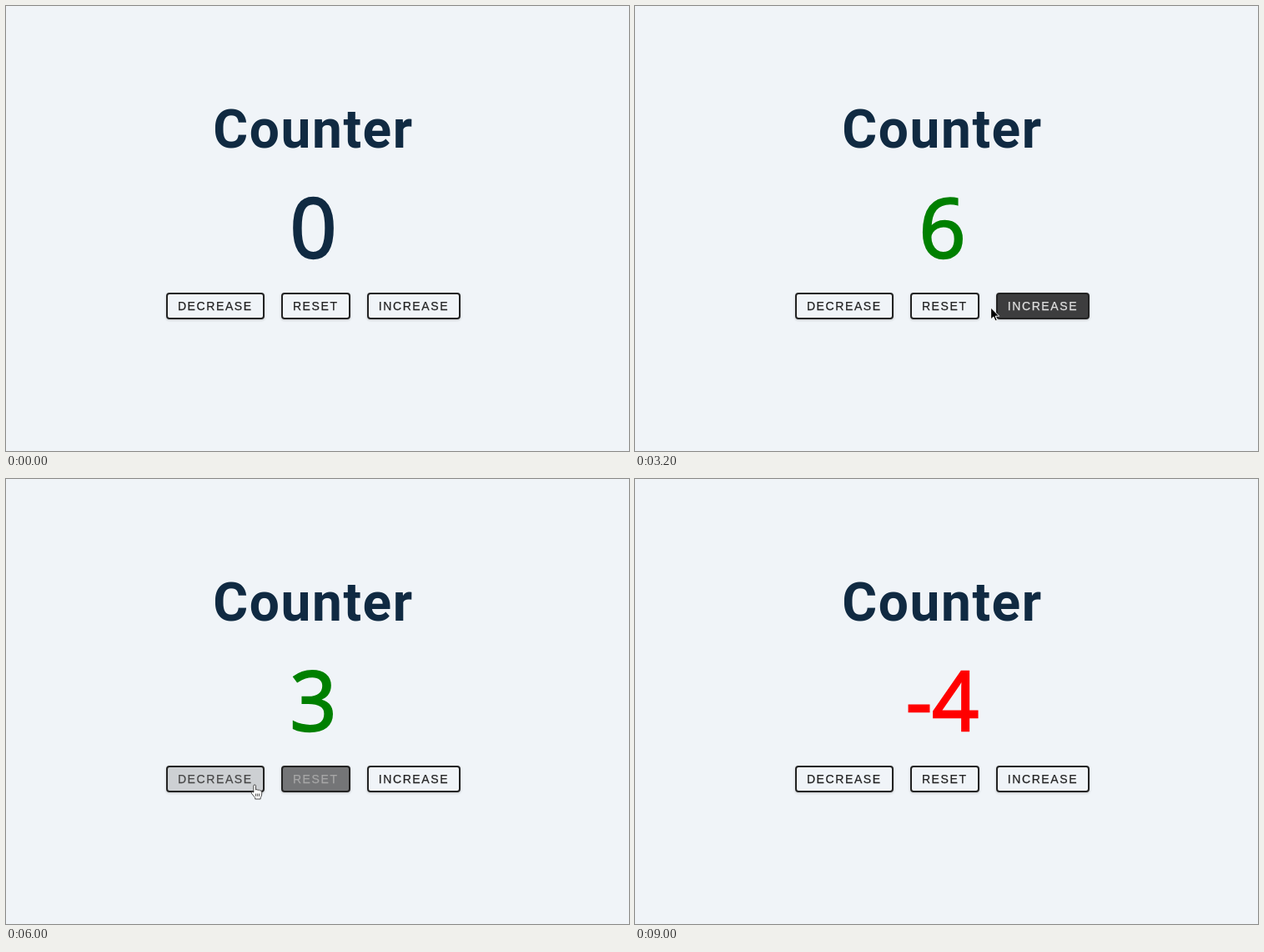
An HTML page for the animation above (9.9 s loop, 747x534 px).

```html
<!DOCTYPE html>
<html lang="en">
<head>
<meta charset="utf-8">
<title>Counter</title>
<style>
html, body { margin: 0; width: 100%; height: 100%; overflow: hidden; background: #f0f4f8; }
svg { position: absolute; left: 0; top: 0; }
.title { font: 700 64px Roboto, sans-serif; letter-spacing: 1.6px; fill: #102a42; }
.count { font: 400 98px "Open Sans", sans-serif; fill: currentColor; stroke: currentColor; stroke-width: 2.4; }
.row { position: absolute; left: 0; top: 344px; width: 737px; display: flex; justify-content: center; gap: 20.16px; }
.btn {
  font: 14px/16px "Liberation Sans", Arial, sans-serif; letter-spacing: 1.6px;
  padding: 6px 12px; border: 2px solid #222; border-radius: 4px;
  box-shadow: 0 1px 3px rgba(0, 0, 0, .2); color: #222; -webkit-text-stroke: .25px;
}
</style>
</head>
<body>
<div class="row">
  <div class="btn">DECREASE</div>
  <div class="btn">RESET</div>
  <div class="btn">INCREASE</div>
</div>
<svg width="747" height="534">
  <text class="title" x="368.5" y="170" text-anchor="middle">Counter</text>
  <text class="count" x="368.5" y="302" text-anchor="middle">0</text>
  <g id="cursor" stroke-linejoin="round">
    <path id="arrow" fill="#000" stroke="#fff" d="M0 0V14L3.2 11L5.4 16L7.6 15L5.5 10.2H10Z"/>
    <g id="hand" stroke="#222" stroke-width=".8">
      <path fill="#fff" d="M-1.3 9V1.2a1.3 1.3 0 0 1 2.6 0V6q1.4-1 2.6 .3q1.4-.7 2.4 .5q2-.4 2.2 1.5V11q0 2.5-1.5 4.5V17H.5V15.5L-3.8 10.2q-.8-1.8 1-2Z"/>
      <path fill="none" d="M1.4 10.5v3.2M3.4 10.5v3.2M5.4 10.5v3.2"/>
    </g>
  </g>
</svg>
<script>
const LOOP = 9900, FRAME = 100, FADE = 300;
const ENTER = { t: 300, x: 440, y: 436 }, LEAVE = 9000;

// Pointer moves; it rests at each stop until the next one starts.
const moves = [
  { start: 300, end: 900, x: 474, y: 358 },
  { start: 3000, end: 3500, x: 400, y: 360 },
  { start: 4200, end: 4700, x: 501, y: 363 },
  { start: 5500, end: 6300, x: 265, y: 363 },
  { start: 8600, end: LEAVE, x: 250, y: 545 }
];

// Each click acts on the button under the pointer.
const clicks = [
  1100, 1500, 1900, 2200, 2700, 2900, 3700, 4900, 5300, 5600,
  6700, 6900, 7200, 7600, 7900, 8200, 8600
];
const actions = [v => v - 1, () => 0, v => v + 1];

const buttons = [...document.querySelectorAll('.btn')];
const boxes = buttons.map(b => b.getBoundingClientRect());
const count = document.querySelector('.count');
const [cursor, arrow, hand] = ['cursor', 'arrow', 'hand'].map(id => document.getElementById(id));
const show = (el, on) => el.setAttribute('visibility', on ? 'visible' : 'hidden');

function pointer(t) {
  if (t < ENTER.t || t >= LEAVE) return null;
  const i = moves.findLastIndex(m => m.start <= t);
  const to = moves[i], from = moves[i - 1] || ENTER;
  const k = Math.min(1, (t - to.start) / (to.end - to.start));
  const ease = k * (2 - k), dx = to.x - from.x;
  const dip = .04 * Math.abs(dx) * Math.sin(Math.PI * ease);
  return { x: from.x + dx * ease, y: from.y + (to.y - from.y) * ease + dip };
}

// Index of the button under the pointer, or -1.
function target(t) {
  const p = pointer(t);
  return p ? boxes.findIndex(b => p.x >= b.left && p.x <= b.right && p.y >= b.top && p.y <= b.bottom) : -1;
}

// A linear fade equals the share of the last FADE ms spent over the button.
function hover(t, i) {
  let hits = 0;
  for (let d = 0; d < FADE; d += 10) hits += target(t - d) === i;
  return hits * 10 / FADE;
}

function draw(t) {
  const done = clicks.filter(c => c <= t);
  const n = done.reduce((v, c) => actions[target(c)](v), 0);
  count.textContent = n;
  count.style.color = n > 0 ? 'green' : n < 0 ? 'red' : done.length ? '#222' : '#102a42';

  buttons.forEach((b, i) => {
    const a = hover(t, i), c = Math.round(34 + 221 * a);
    b.style.background = `rgba(34,34,34,${a})`;
    b.style.color = `rgb(${c},${c},${c})`;
  });

  const p = pointer(t), link = target(t) >= 0;
  show(arrow, p && !link);
  show(hand, p && link);
  if (p) cursor.setAttribute('transform', `translate(${p.x} ${p.y})`);
}

function tick() {
  const t = performance.now() % LOOP;
  draw(Math.floor(t / FRAME) * FRAME);
  requestAnimationFrame(tick);
}
tick();
</script>
</body>
</html>
```
